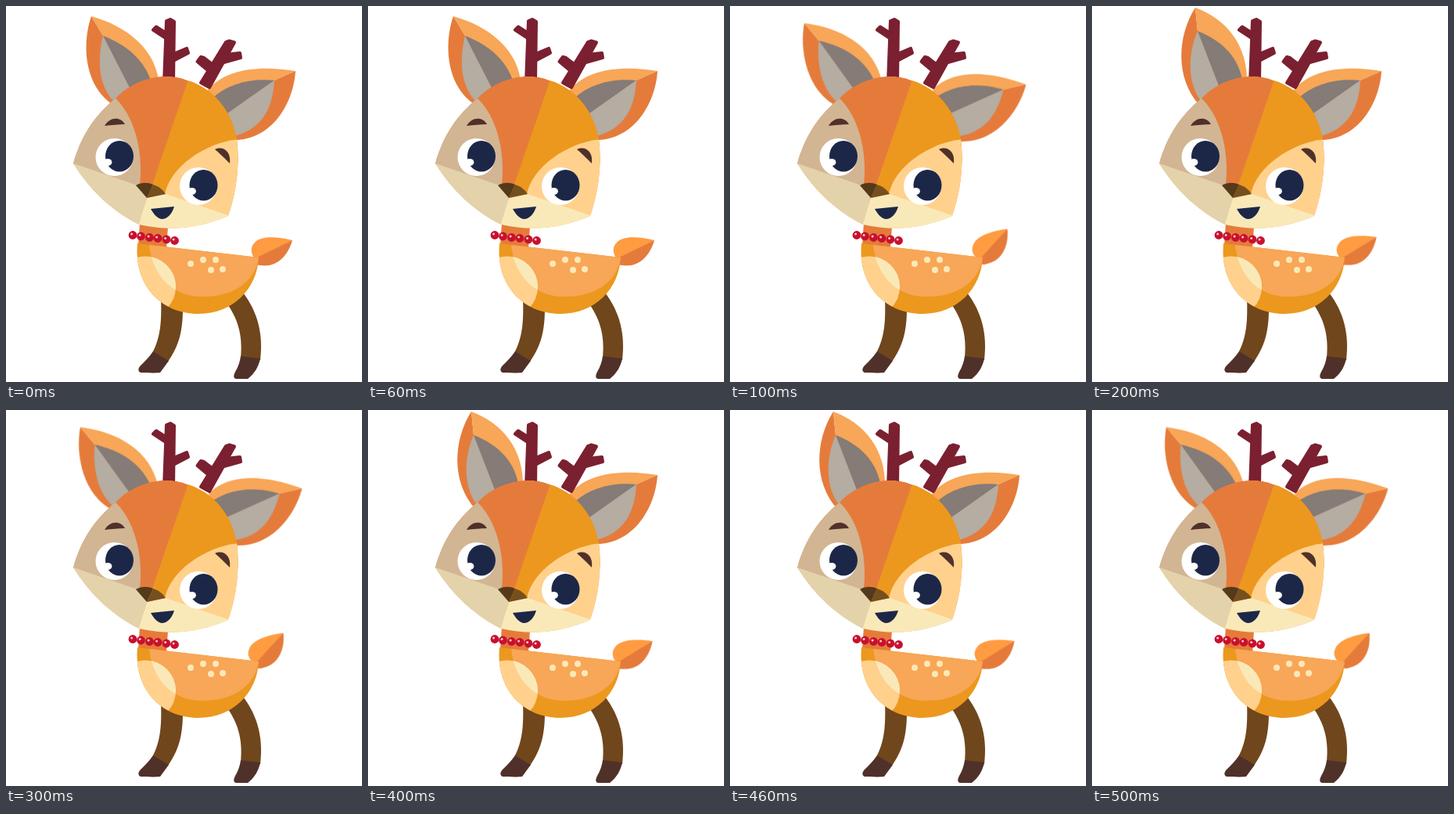
These frames come from a looping animation (455x480 px, 600 ms). An HTML page:

```html
<!DOCTYPE html>
<html lang="en">
<head>
<meta charset="utf-8">
<title>Little deer</title>
<style>
  html, body { margin: 0; width: 100%; height: 100%; overflow: hidden; background: #fff; }
  svg { display: block; width: 100vw; height: 100vh; }

  .rust { fill: #e57b3b; }
  .amber { fill: #ec981e; }
  .apricot { fill: #f8a657; }
  .peach { fill: #ffd18d; }
  .cream { fill: #fae9b8; }
  .ash { fill: #b5aca2; }
  .stone { fill: #857b77; }
  .navy { fill: #1c2748; }
  .brown { fill: #70461c; }
  .hoof, .brow { fill: #50312a; }
  .antler { fill: #7b2030; stroke: #7b2030; stroke-width: 4; stroke-linejoin: round; }

  .move { animation: .6s step-end infinite; }
  .ear-l { transform-origin: 160px 110px; animation-name: ear-l; }
  .ear-up { visibility: hidden; animation-name: ear-up; }
  .ear-r { transform-origin: 285px 135px; animation-name: ear-r; }
  .tail { transform-origin: 322px 322px; animation-name: tail; }

  @keyframes ear-l {
    0% { transform: none; visibility: visible; }
    16.66%, 50%, 83.33% { transform: rotate(-8.7deg); visibility: visible; }
    33.33%, 66.66% { transform: none; visibility: hidden; }
  }
  @keyframes ear-up {
    0%, 16.66%, 50%, 83.33% { visibility: hidden; }
    33.33%, 66.66% { visibility: visible; }
  }
  @keyframes ear-r {
    0%, 33.33%, 66.66% { transform: none; }
    16.66%, 50%, 83.33% { transform: rotate(11deg); }
  }
  @keyframes tail {
    0% { transform: none; }
    16.66%, 50%, 83.33% { transform: rotate(-21.5deg); }
    33.33%, 66.66% { transform: rotate(-5.5deg); }
  }
</style>
</head>
<body>
<svg viewBox="0 0 455 480" preserveAspectRatio="none">
  <defs>
    <path id="body" d="M168 303L184 305L323 321C321 360 291 393 246 393C198 393 163 356 168 303Z"/>
    <path id="flank" d="M183 305L323 321C318 355 286 372 250 371C212 371 187 343 183 305Z"/>
    <path id="head" d="M86 201C95 168 113 139 140 118C161 95 200 82 232 95C266 105 289 135 295 170C299 203 295 237 284 268C247 284 210 288 170 279C136 262 107 235 86 201Z"/>
    <clipPath id="in-body"><use href="#body"/></clipPath>
    <clipPath id="in-flank"><use href="#flank"/></clipPath>
    <clipPath id="in-head"><use href="#head"/></clipPath>
    <g id="bead"><circle r="5.4" fill="#c8102e"/><circle cx="-1.4" cy="-1.4" r="1.5" fill="#f7c9cf"/></g>
    <g id="eye">
      <circle r="24" fill="#fff"/>
      <ellipse class="navy" cx="6.5" cy="-1.2" rx="18" ry="19.8"/>
      <ellipse cx="-8.5" cy="6.5" rx="5.4" ry="4.6" fill="#fff"/>
    </g>
  </defs>

  <!-- ears -->
  <g class="move ear-l">
    <path class="rust" d="M109 13C97 48 99 102 138 127L165 118L124 38Z"/>
    <path class="apricot" d="M109 13C155 26 194 56 196 104L165 118L124 38Z"/>
    <path class="ash" d="M124 38C117 66 117 101 138 122L165 118Z"/>
    <path class="stone" d="M124 38C155 50 181 71 188 106L165 118Z"/>
  </g>
  <g class="move ear-up">
    <path class="rust" d="M132 2C109 38 106 92 137 126L168 115L135 32Z"/>
    <path class="apricot" d="M132 2C172 17 199 50 198 98L168 115L135 32Z"/>
    <path class="ash" d="M135 32C122 62 122 98 139 121L168 117Z"/>
    <path class="stone" d="M135 32C166 44 189 66 193 100L168 117Z"/>
  </g>
  <g class="move ear-r">
    <path class="apricot" d="M370 83C328 76 278 78 254 112L270 142L343 95Z"/>
    <path class="rust" d="M370 83C367 128 337 171 292 171L275 143L343 95Z"/>
    <path class="stone" d="M343 95C313 92 284 99 262 119L275 143Z"/>
    <path class="ash" d="M343 95C341 130 328 158 288 167L275 143Z"/>
  </g>

  <!-- antlers -->
  <g class="antler">
    <path d="M205 19L210 17L215 20L214 98H202Z"/>
    <path d="M188 30.5L192 26.5L207 36V43Z"/>
    <path d="M212 62L231 54L233 60L212 71Z"/>
    <path d="M281 46L285 44.5L292 46.5L260 104L249 98Z"/>
    <path d="M244.5 71L249 65L253 66L266 76L260 84Z"/>
    <path d="M281 62L299 60L300 66L275 73Z"/>
  </g>

  <!-- tail and legs -->
  <g class="move tail">
    <path fill="#ff9b40" d="M366 299C347 295 326 292 317 303C311 310 314 318 319 325Z"/>
    <path class="rust" d="M366 299C359 323 342 336 320 330L317 323Z"/>
  </g>
  <path class="brown" d="M198 372C199 402 198 422 187 443L207 454C221 434 226 415 226 386Z"/>
  <path class="hoof" d="M188 441L208 453L197 468C189 469 178 468 172 468C168 466 169 462 172 459C178 453 183 448 188 441Z"/>
  <path class="brown" d="M281 378C296 398 303 420 300 449L325 452C329 419 322 391 303 366Z"/>
  <path class="hoof" d="M300 447L325 450C323 460 318 469 309 476H294C290 475 291 471 293 467C297 460 299 454 300 447Z"/>

  <!-- body -->
  <path class="rust" d="M171 276L207 282L205 309L169 306Z"/>
  <use href="#body" class="amber"/>
  <use href="#flank" class="apricot"/>
  <circle class="peach" cx="178" cy="358.5" r="39" clip-path="url(#in-body)"/>
  <circle class="cream" cx="178" cy="358.5" r="39" clip-path="url(#in-flank)"/>
  <g class="cream">
    <circle cx="236" cy="329" r="4"/><circle cx="252" cy="324" r="4"/><circle cx="268" cy="324" r="4"/>
    <circle cx="262" cy="337" r="4"/><circle cx="277" cy="336" r="4"/>
  </g>
  <use href="#bead" x="162" y="292.5"/><use href="#bead" x="172.5" y="294"/>
  <use href="#bead" x="183.5" y="295.5"/><use href="#bead" x="194" y="296.5"/>
  <use href="#bead" x="205" y="298"/><use href="#bead" x="215.5" y="299.5"/>

  <!-- head -->
  <g clip-path="url(#in-head)">
    <use href="#head" class="rust"/>
    <path class="amber" d="M233 94L187 228L204 242L300 200V80Z"/>
    <path fill="#d2b593" d="M139 117C163 139 176 183 171 228L180 245L80 201V110Z"/>
    <path fill="#e4d3aa" d="M80 199L86 201L168 229L180 245L170 282L80 290Z"/>
    <path class="peach" d="M300 170C256 173 210 205 203 240L300 275Z"/>
    <path class="cream" d="M180 245L204 240L286 268L290 295H165Z"/>
  </g>
  <path fill="#55391b" d="M166 229C173 225 181 225 188 228L180 245Z"/>
  <path fill="#75501e" d="M188 228C195 230 201 235 204 240L180 245Z"/>
  <path class="navy" d="M185 259L215 256C212 266 206 272 199 272C193 271 189 266 185 259Z"/>
  <use href="#eye" x="138.5" y="193"/>
  <use href="#eye" x="246" y="230"/>
  <path class="brow" d="M126 153C132 142 146 140 152 151C143 151 135 152 126 153Z"/>
  <path class="brow" d="M267 183C279 178 288 187 286 201C280 195 274 189 267 183Z"/>
</svg>
</body>
</html>
```
